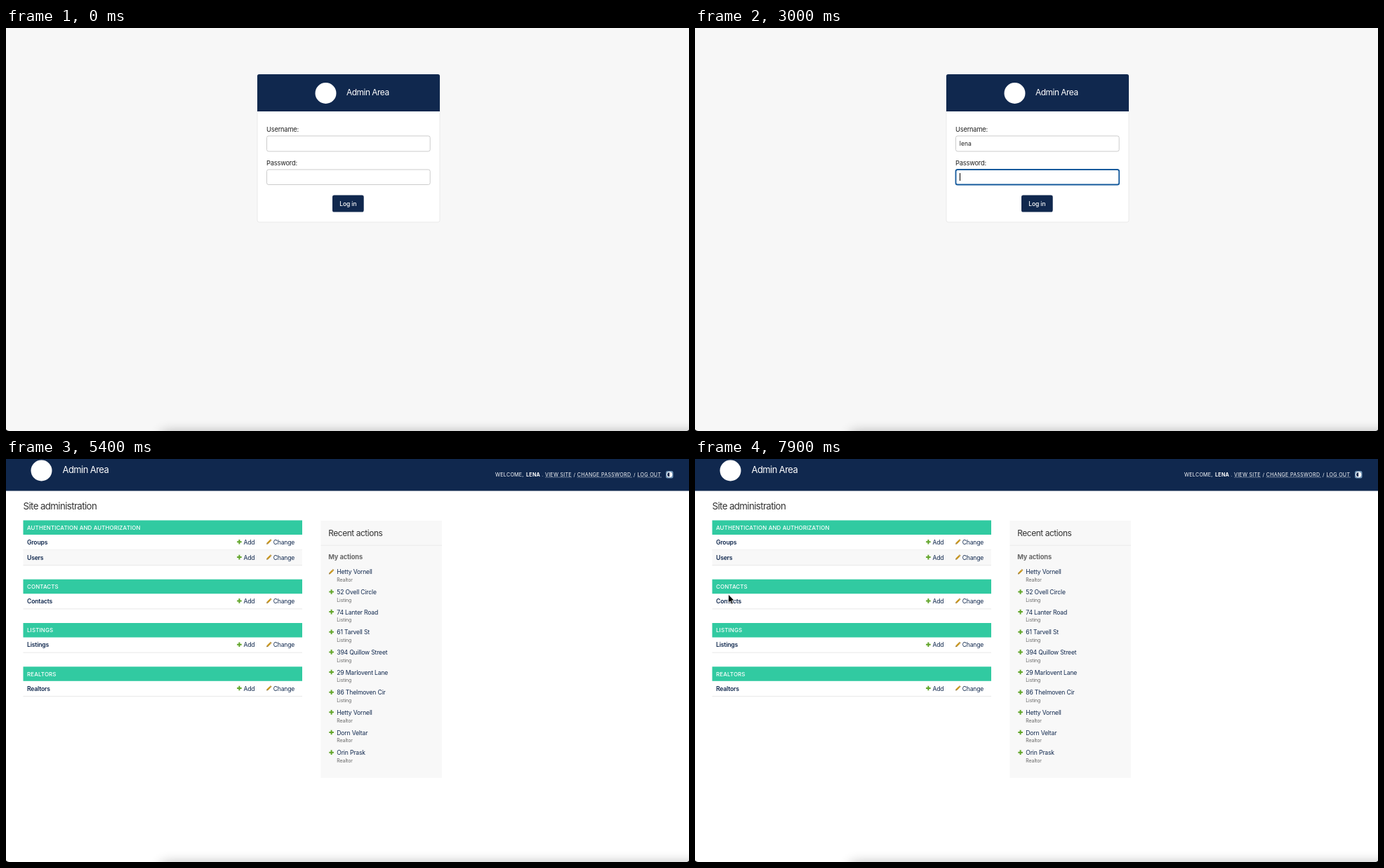
Animation, 973 px wide and 575 px high, one loop 8000 ms. Source, as an HTML page:

```html
<!DOCTYPE html>
<html lang="en">
<head>
<meta charset="utf-8">
<title>Admin Area</title>
<style>
  html, body { margin: 0; width: 100%; height: 100%; overflow: hidden; background: #fff; }
  svg { display: block; width: 973px; height: 575px; }
  text { font-family: Inter, Roboto, sans-serif; white-space: pre; }
  .navy { fill: #10284e; }
  .field { fill: #fff; stroke: #ccc; }
  .field.focus { stroke: #155a9c; stroke-width: 1.8; }
  .icon { fill: none; stroke: #c8c8c8; }
</style>
</head>
<body>
<svg viewBox="0 0 973 575">
  <defs>
    <filter id="soft" x="-10%" y="-60%" width="120%" height="220%"><feGaussianBlur stdDeviation="9"/></filter>
    <filter id="drop" x="-10%" y="-10%" width="120%" height="130%"><feDropShadow dx="0" dy="1" stdDeviation="1.2" flood-opacity=".3"/></filter>
    <g id="plus"><path d="M-3.3 0H3.3M0 -3.3V3.3" stroke="#62a52a" stroke-width="2"/></g>
    <g id="pencil">
      <path d="M-2.2 2.2L2 -2" stroke="#c8951c" stroke-width="2.4"/>
      <path d="M2.2 -2.2L3 -3" stroke="#a87b20" stroke-width="2.4"/>
      <path d="M-3.6 3.6L-3.1 1.3L-1.3 3.1Z" fill="#8a6a2a"/>
    </g>
  </defs>

  <g id="login">
    <rect width="973" height="575" fill="#f7f7f7"/>
    <rect x="358" y="66.500" width="260" height="210.500" rx="2.600" fill="#fff" stroke="#e9e9e9"/>
    <path class="navy" d="M358 119V68.600Q358 66 360.600 66H615.400Q618 66 618 68.600V119Z"/>
    <circle cx="455.500" cy="93" r="15" fill="#fff"/>
    <rect class="field" id="userBox" x="371.500" y="154" width="232.700" height="22" rx="2.600"/>
    <rect class="field" id="passBox" x="371.500" y="202" width="232.700" height="21.500" rx="2.600"/>
    <rect class="navy" x="465" y="238.500" width="44.700" height="24" rx="2.600"/>
    <g id="loginText"></g>
    <text id="user" x="376.800" y="168.300" font-size="8.600" fill="#222"></text>
    <g id="dots"></g>
    <path id="caret" d="M.5 0V11" stroke="#000"/>
    <g id="popup">
      <path filter="url(#drop)" fill="#1f1f1f" d="M440 182H444.500L450 177L455.500 182H554Q558 182 558 186V237Q558 241 554 241H440Q436 241 436 237V186Q436 182 440 182Z"/>
      <path d="M436 211.500H558" stroke="#555"/>
      <path class="icon" d="M446.800 193.700H455V200.300H446.800ZM446.800 194.300L450.900 197.300L455 194.300"/>
      <circle cx="450.900" cy="227" r="4.300" fill="#c8c8c8"/>
      <g id="popupText"></g>
    </g>
  </g>

  <g id="admin">
    <rect width="973" height="575" fill="#fff"/>
    <rect class="navy" width="973" height="45.500"/>
    <circle cx="50.500" cy="16.500" r="15" fill="#fff"/>
    <path d="M768 26H806M813.500 26H892M899.500 26H934" stroke="#8592a8" stroke-width=".8"/>
    <rect x="940" y="17" width="10.500" height="10.500" rx="2.500" fill="#7396b8"/>
    <circle cx="945.200" cy="22.200" r="4" fill="#fff"/>
    <path class="navy" d="M945.200 19.200A3 3 0 0 0 945.200 25.200Z"/>
    <rect x="448.500" y="88" width="172.500" height="367" fill="#f8f8f8"/>
    <path d="M448.500 123.200H621" stroke="#e9e9e9"/>
    <g id="adminBody"></g>
  </g>

  <rect x="222" y="577" width="900" height="100" filter="url(#soft)" opacity=".32"/>
  <path d="M0 572.500Q1 574.500 5 575H0ZM973 573Q972.500 574.500 970 575H973Z"/>

  <path id="arrow" d="M0 0V12.300L2.800 9.800L4.700 14.200L6.700 13.300L4.900 9.100H8.700Z" stroke="#fff" stroke-width=".8"/>
  <path id="beam" d="M460.500 157.500Q463.500 157.500 463.500 159.500V168.500Q463.500 170.500 460.500 170.500M466.500 157.500Q463.500 157.500 463.500 159.500M463.500 168.500Q463.500 170.500 466.500 170.500" fill="none" stroke="#222"/>
</svg>

<script>
const $ = id => document.getElementById(id);
const NAVY = '#10284e';

// y is the middle of the capitals, gap the tracking in em
const text = (x, y, size, str, fill = NAVY, weight = 400, gap = -0.02) =>
  `<text x="${x}" y="${y + size * 0.36}" font-size="${size}" fill="${fill}" ` +
  `font-weight="${weight}" letter-spacing="${gap * size}">${str}</text>`;
const icon = (name, x, y) => `<use href="#${name}" x="${x}" y="${y}"/>`;

$('loginText').innerHTML =
  text(485, 92, 11.9, 'Admin Area', '#fff', 400, -0.04) +
  text(371, 144.5, 9.28, 'Username:', '#222') +
  text(371, 192.2, 9.28, 'Password:', '#222') +
  text(475.2, 250.7, 8.5, 'Log in', '#fff', 500, -0.01);

$('popupText').innerHTML =
  text(465, 197, 8.6, 'lena@ltavermole.io', '#fff', 600) +
  text(465, 227, 8.5, 'Manage Addresses…', '#d2d2d2', 400, -0.015);

const welcome = [
  [697, 'WELCOME,'], [741, 'LENA', 700], [763.3, '.'], [768, 'VIEW SITE'], [808.5, '/'],
  [813.7, 'CHANGE PASSWORD'], [894, '/'], [899.5, 'LOG OUT']
].map(([x, str, weight]) => text(x, 22, 7.1, str, '#fff', weight, 0.04)).join('');

function row(y, name, shaded) {
  const mid = y + 11;
  return (shaded ? `<rect x="24.500" y="${y}" width="397.500" height="22" fill="#f8f8f8"/>` : '') +
    `<path d="M24.500 ${y + 22}H422" stroke="#e8e8e8"/>` +
    text(30, mid, 8.6, name, NAVY, 600) +
    icon('plus', 332.4, mid - 0.5) + text(338.5, mid, 8.6, 'Add') +
    icon('pencil', 374.7, mid - 0.5) + text(380.7, mid, 8.6, 'Change');
}

const module = (y, title, rows) =>
  `<rect x="24.500" y="${y}" width="397.500" height="20.500" fill="#31caa1"/>` +
  text(30, y + 10.4, 7.9, title, '#fff', 500, 0.02) +
  rows.map((name, i) => row(y + 20.2 + i * 21.9, name, i % 2)).join('');

const actions = [
  'Hetty Vornell', '52 Ovell Circle', '74 Lanter Road', '61 Tarvell St', '394 Quillow Street',
  '29 Marlovent Lane', '86 Thelmoven Cir', 'Hetty Vornell', 'Dorn Veltar', 'Orin Prask'
].map((name, i) => {
  const y = 161.3 + i * 28.65;
  const kind = /^\d/.test(name) ? 'Listing' : 'Realtor';
  return icon(i ? 'plus' : 'pencil', 463.6, y - 0.5) + text(471.3, y, 8.6, name) +
    text(471.3, y + 11.2, 6.9, kind, '#666', 400, -0.01);
}).join('');

$('adminBody').innerHTML = welcome +
  text(80.5, 15, 12.9, 'Admin Area', '#fff', 400, -0.04) +
  text(24.5, 67.3, 13.27, 'Site administration', '#333', 400, -0.045) +
  text(459.2, 105.3, 11.9, 'Recent actions', '#333', 400, -0.035) +
  text(459.2, 140, 9.28, 'My actions', '#666', 700, -0.01) +
  module(87.5, 'AUTHENTICATION AND AUTHORIZATION', ['Groups', 'Users']) +
  module(171.7, 'CONTACTS', ['Contacts']) +
  module(234, 'LISTINGS', ['Listings']) +
  module(296.3, 'REALTORS', ['Realtors']) +
  actions;

$('dots').innerHTML = Array.from({ length: 6 }, (_, i) =>
  `<circle cx="${378.9 + i * 4}" cy="213" r="1.100" fill="#222"/>`).join('');
const dots = [...$('dots').children];

const userKeys = [1700, 1900, 2400, 2600];
const userCaret = [377, 379, 384, 389, 394];
const passKeys = [3800, 4000, 4200, 4400, 4700, 4900];

// one pointer position per 100 ms
const enter = [[319, 250], [385, 190], [455, 130], [505, 97], [512, 120], [485, 150]];
const roam = [
  [463, 164], [522, 187], [590, 217], [641, 246], [664, 264], [650, 286], [590, 305], [500, 313],
  [411, 311], [325, 296], [228, 262], [140, 222], [76, 187], [43, 170], [37, 181], [47.5, 193]
];

const show = (el, on) => el.setAttribute('visibility', on ? 'inherit' : 'hidden');
const typed = (keys, t) => keys.filter(k => t >= k).length;

function draw(now) {
  const t = now % 8000;
  const step = Math.floor(t / 100);
  const inside = t >= 5400;
  const onUser = t >= 900 && t < 3000;
  const onPass = t >= 3000 && !inside;
  const chars = typed(userKeys, t);
  const stars = typed(passKeys, t);

  show($('login'), !inside);
  show($('admin'), inside);
  show($('popup'), onUser);
  $('userBox').classList.toggle('focus', onUser);
  $('passBox').classList.toggle('focus', onPass);
  $('user').textContent = 'lena'.slice(0, chars);
  dots.forEach((dot, i) => show(dot, i < stars));

  const blink = (t >= 1300 && t < 1700) || (t >= 3500 && t < 3800);
  show($('caret'), (onUser || onPass) && !blink);
  const caretX = onUser ? userCaret[chars] : 377 + stars * 4;
  $('caret').setAttribute('transform', `translate(${caretX} ${onUser ? 159 : 207})`);

  const spot = inside ? roam[step - 64] : enter[step - 1];
  show($('arrow'), spot);
  if (spot) $('arrow').setAttribute('transform', `translate(${spot})`);
  show($('beam'), t >= 700 && t < 1700);
}

const start = performance.now();
function tick() {
  draw(performance.now() - start);
  requestAnimationFrame(tick);
}
tick();
</script>
</body>
</html>
```
